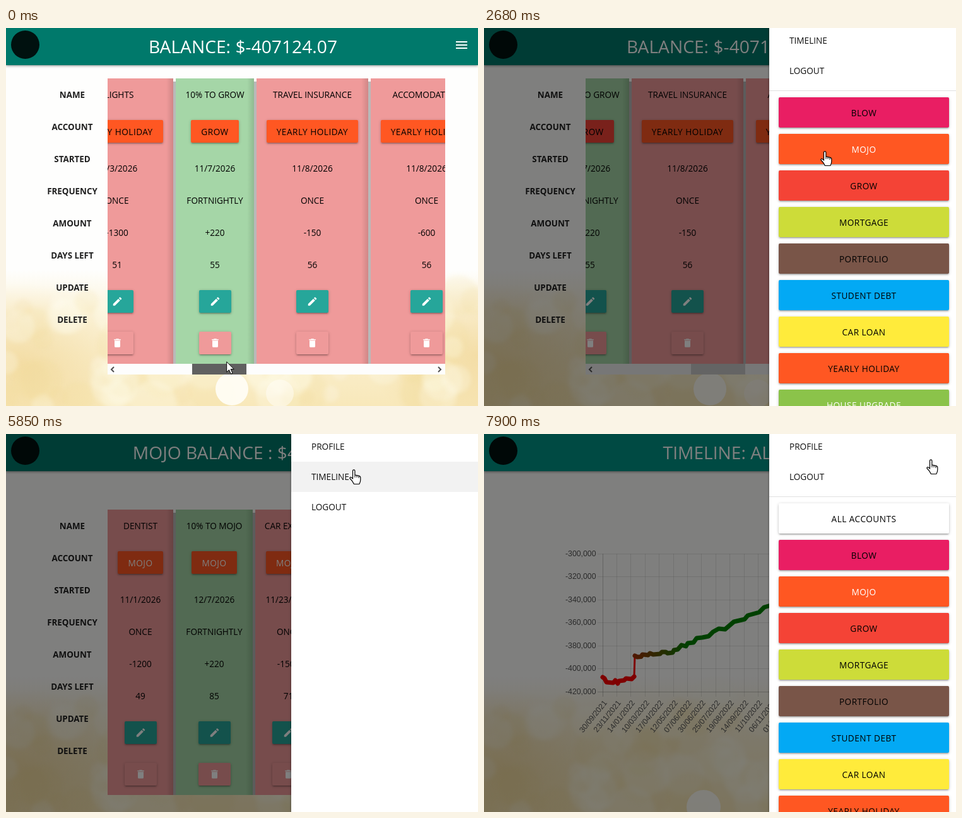
Animation of 748 by 600 pixels, one loop 8000 ms. Source, as an HTML page:

```html
<!DOCTYPE html>
<html lang="en">
<head>
<meta charset="utf-8">
<title>Budget planner</title>
<style>
html, body { margin: 0; width: 100%; height: 100%; overflow: hidden; background: #fff; }
#stage { position: relative; width: 748px; height: 600px; overflow: hidden; font: 13.6px/20px "Open Sans", sans-serif; color: #000; }
#stage div, #stage svg { position: absolute; }
.full { left: 0; top: 0; width: 748px; height: 600px; }
.header { left: 0; top: 0; width: 748px; height: 59px; background: #00796b; box-shadow: 0 1px 4px rgba(0,0,0,.45); }
#timeline .header { background: #009688; }
.emblem { left: 8px; top: 4px; width: 45px; height: 45px; border-radius: 50%; background: #00110f; }
.title { left: 0; top: 9px; width: 751px; font-size: 28.2px; line-height: 40px; text-align: center; color: #fff; white-space: nowrap; }
.menu { left: 710px; top: 15px; fill: #fff; }
.label { left: 30px; width: 150px; text-align: center; font-weight: 700; font-size: 13.4px; color: #212121; }
.view { left: 161px; width: 535px; height: 453px; overflow: hidden; }
.column { top: 0; height: 453px; background: linear-gradient(90deg, transparent calc(100% - 11px), rgba(0,0,0,.13)) #ef9a9a; }
.column.green { background-color: #a5d6a7; }
.column::after { content: ""; position: absolute; left: 100%; top: 5px; bottom: 0; width: 4px; background: #b9b9b9; }
.short .column:last-child { background: #ef9a9a; }
.short .column:last-child::after { width: 10px; background: linear-gradient(90deg, rgba(0,0,0,.14), rgba(0,0,0,.06)); }
.cell { left: 0; width: 100%; text-align: center; white-space: nowrap; }
.button { display: inline-block; height: 36px; line-height: 37px; padding: 0 16px; letter-spacing: .5px; border-radius: 2px; }
.button, .account { box-shadow: 0 2px 2px rgba(0,0,0,.14), 0 3px 1px -2px rgba(0,0,0,.12), 0 1px 5px rgba(0,0,0,.2); }
.button svg { position: static !important; display: block; margin: 9px 0; fill: #fff; width: 19px; height: 18px; }
.scrollbar { left: 161px; top: 533px; width: 535px; height: 17px; background: #f0f0f0; }
.scrollbar svg { left: 0; top: 0; fill: none; stroke: #505050; stroke-width: 2; }
#thumb { top: 0; width: 86px; height: 17px; }
#pagebar { left: 735px; top: 0; width: 13px; height: 600px; background: linear-gradient(#f0f0f0 12px, #c9c9c9 12px); }
#shade { background: #000; }
#nav { left: 452px; top: 0; width: 296px; height: 600px; background: #fff; box-shadow: 0 0 4px rgba(0,0,0,.4); overflow: hidden; }
.link { left: 0; width: 264px; height: 48px; line-height: 48px; padding-left: 32px; color: #111; }
.link.hover { background: #f2f2f2; }
.divider { top: 99px; width: 296px; height: 1px; background: #e0e0e0; }
.account { left: 15px; width: 270px; height: 48px; line-height: 49px; text-align: center; letter-spacing: .5px; border-radius: 2px; }
#chart text { font: 12.3px "Liberation Sans", Arial, sans-serif; fill: #555; }
</style>
</head>
<body>
<div id="stage"></div>
<script>
const LOOP = 8000;
const ORANGE = '#ff5722';
const accounts = [['BLOW', '#e91e63'], ['MOJO', ORANGE], ['GROW', '#f44336'], ['MORTGAGE', '#cddc39'],
  ['PORTFOLIO', '#795548'], ['STUDENT DEBT', '#03a9f4'], ['CAR LOAN', '#ffeb3b'],
  ['YEARLY HOLIDAY', ORANGE], ['HOUSE UPGRADE', '#8bc34a']];
const colorOf = Object.fromEntries(accounts);
const textColor = name => /MOJO|HOUSE/.test(name) ? '#fff' : '#000';

const icon = (path, cls = '') => `<svg class="${cls}" width="24" height="24" viewBox="0 0 24 24"><path d="${path}"/></svg>`;
const MENU = 'M3 18h18v-2H3zM3 13h18v-2H3zM3 6v2h18V6z';
const PENCIL = 'M3 17.25V21h3.75L17.81 9.94l-3.75-3.75zM20.71 7.04q.7-.7 0-1.41l-2.34-2.34q-.7-.7-1.41 0l-1.83 1.83 3.75 3.75z';
const BIN = 'M6 19q0 2 2 2h8q2 0 2-2V7H6zM19 4h-3.5l-1-1h-5l-1 1H5v2h14z';

const disc = (x, y, r, fill, opacity) => `<circle cx="${x}" cy="${y}" r="${r}" fill="${fill}" opacity="${opacity}"/>`;
const spots = list => `<svg class="full">${list.map(([x, y, r, o]) => disc(x, y, r, '#fffef8', o)).join('')}</svg>`;

function backdrop() {
  let seed = 7;
  const random = () => (seed = seed * 16807 % 2147483647) / 2147483647;
  let discs = '';
  for (let i = 0; i < 90; i++) {
    const x = random() * 748, y = 420 + random() * 180;
    discs += disc(x, y, 12 + random() * 26, i % 2 ? '#fffdf2' : '#f0d48a', i % 2 ? .25 : .13);
  }
  return `<svg class="full"><defs>
    <linearGradient id="cream" x2="0" y2="1"><stop offset=".64" stop-color="#fefefd"/><stop offset=".75" stop-color="#fcf4dc"/><stop offset="1" stop-color="#f8e8ba"/></linearGradient>
    <radialGradient id="gold"><stop stop-color="#edcc80" stop-opacity=".5"/><stop offset="1" stop-color="#edcc80" stop-opacity="0"/></radialGradient></defs>
    <rect width="748" height="600" fill="url(#cream)"/>
    <ellipse cx="20" cy="530" rx="190" ry="125" fill="url(#gold)"/><ellipse cx="745" cy="520" rx="170" ry="125" fill="url(#gold)"/>
    <g style="filter:blur(3px)">${discs}</g></svg>`;
}

const header = title => `<div class="header"></div><div class="emblem"></div><div class="title">${title}</div>${icon(MENU, 'menu')}`;
const cell = (y, html) => `<div class="cell" style="top:${y}px">${html}</div>`;
const button = (color, html, ink = '#000') => `<span class="button" style="background:${color};color:${ink}">${html}</span>`;

function column([x, width, name, account, ...facts]) {
  const green = name.startsWith('10%') ? 'green' : '';
  return `<div class="column ${green}" style="left:${x - 161}px;width:${width}px">` +
    cell(16, name) + cell(66, button(colorOf[account], account, textColor(account))) +
    facts.map((fact, i) => cell(133 + 51 * i, fact)).join('') +
    cell(336, button('#26a69a', icon(PENCIL))) + cell(402, button('#ef9a9a', icon(BIN))) + '</div>';
}

function table(top, columns, cls = '') {
  const labels = ['NAME', 'ACCOUNT', 'STARTED', 'FREQUENCY', 'AMOUNT', 'DAYS LEFT', 'UPDATE', 'DELETE'];
  return labels.map((text, i) => `<div class="label" style="top:${top + 16 + 51 * i}px">${text}</div>`).join('') +
    `<div class="view ${cls}" style="top:${top}px"><div class="columns">${columns.map(column).join('')}</div></div>`;
}

const mainColumns = [
  [87, 178, 'FLIGHTS', 'YEARLY HOLIDAY', '11/3/2026', 'ONCE', '-1300', '51'],
  [269, 124, '10% TO GROW', 'GROW', '11/7/2026', 'FORTNIGHTLY', '+220', '55'],
  [397, 177, 'TRAVEL INSURANCE', 'YEARLY HOLIDAY', '11/8/2026', 'ONCE', '-150', '56'],
  [578, 177, 'ACCOMODATION', 'YEARLY HOLIDAY', '11/8/2026', 'ONCE', '-600', '56'],
  [759, 176, 'TILLUVE SUBSCRIPTION', 'BLOW', '11/10/2026', 'MONTHLY', '-12.5', '58']];
const mojoColumns = [
  [161, 104, 'DENTIST', 'MOJO', '11/1/2026', 'ONCE', '-1200', '49'],
  [269, 122, '10% TO MOJO', 'MOJO', '12/7/2026', 'FORTNIGHTLY', '+220', '85'],
  [395, 105, 'CAR EXCESS', 'MOJO', '11/23/2026', 'ONCE', '-1500', '71']];

const dates = `30/09/2021 23/11/2021 14/01/2022 10/03/2022 17/04/2022 12/05/2022 07/06/2022 30/06/2022 25/07/2022 19/08/2022
  14/09/2022 11/10/2022 06/11/2022 01/12/2022 28/12/2022 27/01/2023 01/03/2023 29/03/2023 11/06/2023 10/10/2023`.split(/\s+/);
const debtCurve = [[180, 386], [183, 388], [186, 394], [197, 395], [200, 391], [204, 396], [206, 392], [214, 391], [217, 388], [226, 389], [230, 385]];
const growthCurve = [[231, 352], [235, 354], [241, 353.5], [243, 350], [252, 351], [255, 348], [260, 350], [271, 349], [274, 346], [280, 346], [283, 348], [291, 347],
  [293, 343], [299, 342], [305, 335], [312, 337], [315, 332], [324, 331], [329, 324], [338, 323], [348, 321], [355, 314], [364, 309], [374, 310],
  [388, 298], [405, 294], [410, 288], [428, 283], [436, 275], [450, 271], [459, 268], [466, 260], [471, 262], [476, 257], [487, 257],
  [492, 252], [506, 247], [516, 241], [531, 238], [535, 233], [541, 236], [545, 232], [557, 231], [562, 224], [569, 222], [573, 213], [618, 210.5]];

function chart() {
  const line = (x1, y1, x2, y2, o = .1) => `<path d="M${x1} ${y1}L${x2} ${y2}" stroke="#000" stroke-opacity="${o}"/>`;
  let grid = '';
  for (let i = 0; i < 7; i++) {
    const y = 190.5 + Math.floor(36.5 * i);
    grid += line(172, y, 618, y, i === 6 ? .22 : .1) + `<text x="169.5" y="${y + 3.5}" text-anchor="end">-${300 + 20 * i},000</text>`;
  }
  dates.forEach((date, i) => {
    const x = Math.floor(180 + 22.4 * i) + .5;
    grid += line(x, 190, x, 417, i ? .1 : .22) +
      `<text text-anchor="end" transform="translate(${x + 7} 427) rotate(-51)">${date}</text>`;
  });
  return `<svg id="chart" class="full"><defs><linearGradient id="debt" gradientUnits="userSpaceOnUse" x1="231" x2="315">
    <stop stop-color="#a03000"/><stop offset="1" stop-color="#008000"/></linearGradient></defs>${grid}
    <g id="curve" fill="none" stroke-linejoin="round" stroke-linecap="round" stroke-width="7">
    <path stroke="#f00"/><path stroke="#f00" stroke-width="3"/><path stroke="url(#debt)"/></g></svg>`;
}

const $ = id => document.getElementById(id);
$('stage').innerHTML = `${backdrop()}
  <div id="main" class="full">${spots([[358, 573, 26, .9], [434, 580, 22, .5]])}${header('BALANCE: $-407124.07')}${table(80, mainColumns)}
    <div class="scrollbar" id="track"><div id="thumb"></div><svg width="535" height="17"><path d="M10 5l-4 4 4 4M524 5l4 4-4 4"/></svg></div></div>
  <div id="mojo" class="full">${header('MOJO BALANCE : $4225.23')}${table(120, mojoColumns, 'short')}</div>
  <div id="timeline" class="full">${spots([[348, 592, 27, .9]])}${header('TIMELINE: ALL')}${chart()}
    <div id="pagebar"><svg width="13" height="12"><path d="M4 7l4-4 4 4" fill="none" stroke="#505050" stroke-width="2"/></svg></div></div>
  <div id="shade" class="full"></div><div id="nav"></div>
  <svg id="arrow" width="16" height="24"><path d="M.7.8v16.4l3.8-3.6 3 6.6 2.6-1.1-2.9-6.5h5z" fill="#fff" stroke="#000"/></svg>
  <svg id="hand" width="20" height="26"><path d="M5.5 2.5a1.7 1.7 0 0 1 3.4 0V9l6.2 1.3q2.7.6 2.7 3V17q0 3-2 6.5H7.5Q5.3 18.5 1 14.5q-.6-2 1.5-2l3 2.3z" fill="#fff" stroke="#000" stroke-width="1.2"/><path d="M9 9v4m3-3v3m3-2v3" stroke="#000"/></svg>
  <svg id="ring" width="18" height="18"><circle cx="9" cy="9" r="5.7" fill="none" stroke="#2196f3" stroke-width="3.4"/></svg>`;

const clamp = v => Math.min(1, Math.max(0, v));
const smooth = v => v * v * (3 - 2 * v);
const within = (t, ...spans) => spans.some(([a, b]) => t >= a && t < b);
const show = (id, on) => { $(id).style.display = on ? '' : 'none'; };
const move = (el, x, y = 0) => { el.style.transform = `translate(${x}px,${y}px)`; };

const pointer = [[0, 349, 529], [60, 349, 529], [360, 372, 529], [540, 372, 529], [840, 675, 38], [1320, 711, 38],
  [1790, 711, 38], [2090, 640, 345], [2560, 540, 190], [2620, 540, 190], [2680, 540, 196], [3980, 540, 196],
  [4280, 719, 41], [4770, 720, 41], [5190, 720, 41], [5850, 551, 57], [6520, 551, 57], [7300, 708, 41], [LOOP, 708, 41]];

function pointerAt(t) {
  const i = pointer.findIndex(key => key[0] > t);
  const [t0, x0, y0] = pointer[i - 1], [t1, x1, y1] = pointer[i];
  const p = smooth((t - t0) / (t1 - t0));
  return [x0 + (x1 - x0) * p, y0 + (y1 - y0) * p];
}

// The side panel advances in 60 ms steps along an ease-out curve.
function slide(t, start) {
  const step = Math.floor((t - start) / 60);
  if (step < 0) return 0;
  return step > 2 ? 1 : 1 - (1 - (step * 60 + 20) / 240) ** 2;
}

function navMarkup(links, buttons) {
  return links.map((text, i) => `<div class="link" style="top:${48 * i - 4}px">${text}</div>`).join('') +
    (buttons.length ? '<div class="divider"></div>' : '') +
    buttons.map(([name, color], i) => `<div class="account" style="top:${110 + 58 * i}px;background:${color};color:${textColor(name)}">${name}</div>`).join('');
}
const scenes = {
  main: { opens: 1430, nav: navMarkup(['TIMELINE', 'LOGOUT'], accounts) },
  mojo: { opens: 4830, nav: navMarkup(['PROFILE', 'TIMELINE', 'LOGOUT'], []) },
  timeline: { opens: 7720, nav: navMarkup(['PROFILE', 'LOGOUT'], [['ALL ACCOUNTS', '#fff'], ...accounts]) }
};

function drawCurve(t) {
  const rise = 1 - (1 - clamp((t - 6500) / 1000)) ** 4;
  const path = points => 'M' + points.map(([x, y]) => `${x} ${409 + (y - 409) * rise}`).join('L');
  const curves = [debtCurve, [debtCurve.at(-1), growthCurve[0]], growthCurve];
  curves.forEach((points, i) => $('curve').children[i].setAttribute('d', path(points)));
}

const growButton = document.querySelector('#main .green .button');
let current;

function draw(t) {
  const name = t < 3050 ? 'main' : t < 6100 ? 'mojo' : 'timeline';
  if (name !== current) {
    Object.keys(scenes).forEach(id => show(id, id === name));
    $('nav').innerHTML = scenes[name].nav;
    current = name;
  }
  const open = slide(t, scenes[name].opens);
  show('nav', open > 0);
  move($('nav'), 296 * (1 - open));
  $('shade').style.opacity = open / 2;

  if (name === 'main') {
    const drag = clamp((t - 30) / 330) * (t >= 60);
    move(document.querySelector('#main .columns'), -163 * drag);
    move($('thumb'), 134 + 33 * drag);
    $('thumb').style.background = t < 360 ? '#606060' : '#c9c9c9';
    $('track').style.background = t < 60 ? '#fdfdfd' : '#f0f0f0';
    growButton.style.background = t < 60 ? ORANGE : colorOf.GROW;
  } else if (name === 'mojo') {
    $('nav').children[1].classList.toggle('hover', t >= 5010);
  } else {
    const widened = open > 0;
    show('pagebar', !widened);
    show('chart', t >= 6280);
    show('curve', t >= 6520);
    move($('chart'), widened ? 8 : 0);
    move(document.querySelector('#timeline .title'), widened ? 1 : -7.5);
    move(document.querySelector('#timeline .menu'), widened ? 0 : -17);
    drawCurve(t);
  }

  const [x, y] = pointerAt(t);
  const hand = within(t, [1000, 3050], [5010, 6100], [7840, LOOP]);
  show('hand', hand);
  show('arrow', !hand);
  show('ring', within(t, [4770, 5010], [7480, 7840]));
  move($('hand'), x - 7, y - 1);
  move($('arrow'), x, y);
  move($('ring'), x + 5, y - 8.5);
}

const start = performance.now();
function tick() {
  draw((performance.now() - start) % LOOP);
  requestAnimationFrame(tick);
}
tick();
</script>
</body>
</html>
```
